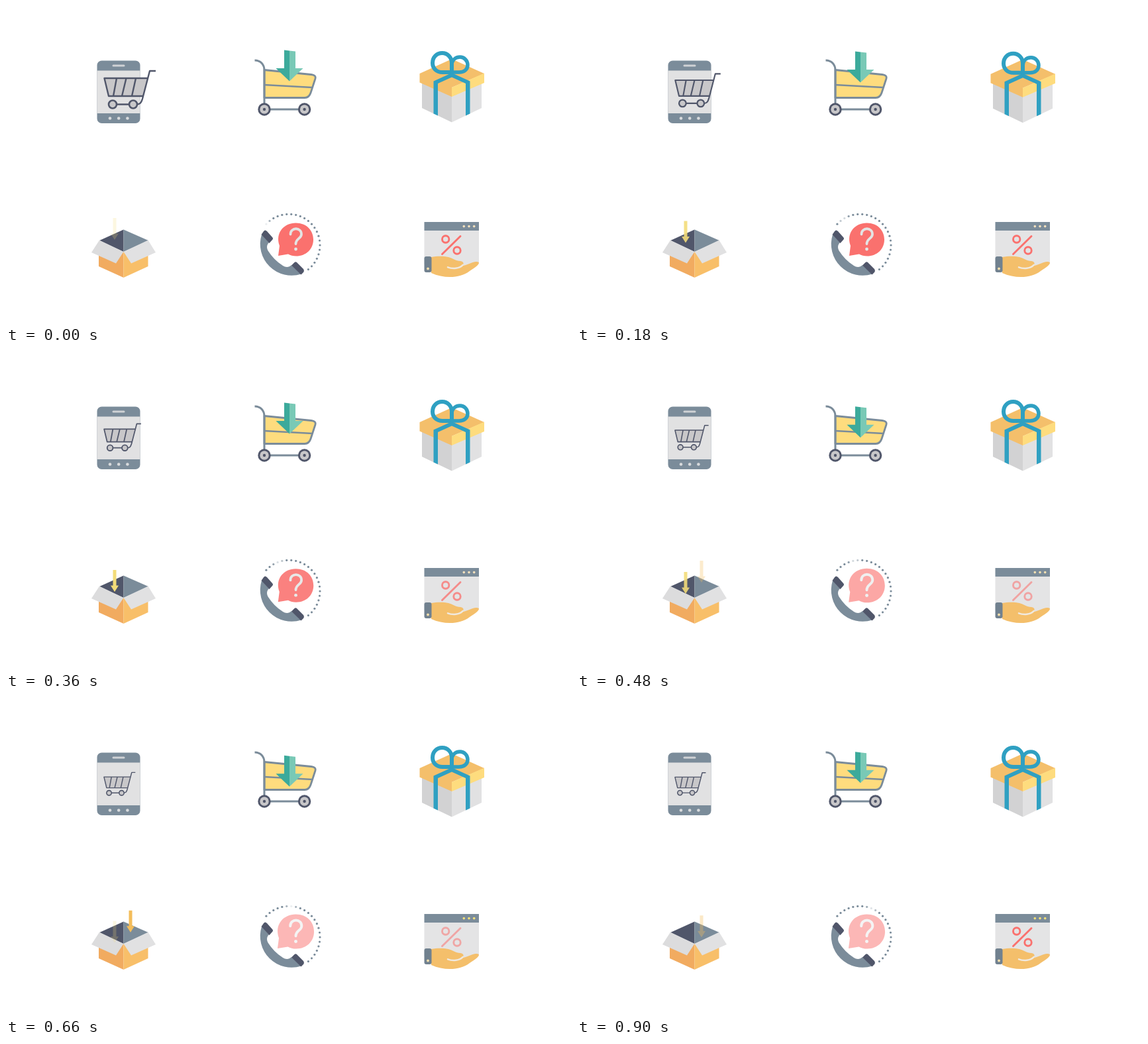
Write an HTML page with a canvas that moves like this. It is 853x480 px and loops after 960 ms.

```html
<!DOCTYPE html>
<html lang="en">
<head>
<meta charset="utf-8">
<title>Shopping icons</title>
<style>
html, body { margin: 0; width: 100%; height: 100%; overflow: hidden; background: #fff; }
canvas { display: block; }
</style>
</head>
<body>
<canvas id="stage" width="853" height="480"></canvas>
<script>
const ctx = document.getElementById('stage').getContext('2d');
const LOOP = 960, STEP = 60;
const SLATE = '#7b8c9a', DARK = '#50566a', PALE = '#e1e1e2', GREY = '#c8c7c9';
const ORANGE = '#f4bf6b', YELLOW = '#fedc7e', RED = '#fa716e', BLUE = '#2fa0c2';

const clamp = v => Math.max(0, Math.min(1, v));
const smooth = v => (v = clamp(v), v * v * (3 - 2 * v));
const settle = (t, pace) => 1 - Math.exp(-((t / pace) ** 1.8));
const bump = (t, peak, width) => Math.exp(-(((t - peak) / width) ** 2));
const window01 = (t, from, to, ramp) => clamp(Math.min(t - from, to - t) / ramp);

function fill(path, color) {
  ctx.fillStyle = color;
  ctx.fill(new Path2D(path));
}

function stroke(path, color, width, cap = 'butt') {
  ctx.strokeStyle = color;
  ctx.lineWidth = width;
  ctx.lineCap = cap;
  ctx.lineJoin = 'round';
  ctx.stroke(new Path2D(path));
}

function disc(x, y, r, color) {
  ctx.fillStyle = color;
  ctx.beginPath();
  ctx.arc(x, y, r, 0, Math.PI * 2);
  ctx.fill();
}

function ring(x, y, r, color, width) {
  ctx.strokeStyle = color;
  ctx.lineWidth = width;
  ctx.beginPath();
  ctx.arc(x, y, r, 0, Math.PI * 2);
  ctx.stroke();
}

function roundRect(x, y, w, h, r, color) {
  ctx.fillStyle = color;
  ctx.beginPath();
  ctx.roundRect(x, y, w, h, r);
  ctx.fill();
}

function group(draw) {
  ctx.save();
  draw();
  ctx.restore();
}

function scaleAbout(x, y, scale) {
  ctx.translate(x, y);
  ctx.scale(scale, scale);
  ctx.translate(-x, -y);
}

function drawPhone(t) {
  roundRect(137.5, 82.5, 65, 94.5, 7, SLATE);
  fill('M137.5 97.5H202.5V162H137.5Z', PALE);
  stroke('M162 90H178', '#cfd2d5', 3, 'round');
  for (let i = 0; i < 3; i++) disc(157 + i * 13.2, 169.5, 2.3, '#d9dbdd');

  scaleAbout(147, 135, 1 - .4 * settle(t, 325));
  fill('M148.5 109H214L207 136H155Z', GREY);
  stroke('M214 109H148.5L155 136H207M167 109L162 136M181.5 109L175 136M196 109L190 136', DARK, 2.4);
  stroke('M226 98H217L206 140C204 147 202 148.5 196 148.5H161', DARK, 2.4);
  for (const x of [161, 192]) {
    disc(x, 148.5, 6, GREY);
    ring(x, 148.5, 6, DARK, 2.6);
  }
}

function drawTrolley(t) {
  const basket = 'M390 96.5L461 103.5Q468.5 104.5 467 109.5L460 131Q457.5 138.5 451 138.5H390Z';
  fill(basket, YELLOW);
  stroke(basket, SLATE, 2.8);
  stroke('M390 119L463 123', SLATE, 2.6);
  stroke('M375.5 82C384 82 390 88 390 97V148', SLATE, 3);
  stroke('M399 156H442', SLATE, 3);
  for (const x of [390, 450.6]) {
    disc(x, 156, 9.7, DARK);
    disc(x, 156, 6.7, GREY);
    disc(x, 156, 2.2, DARK);
  }
  ctx.translate(428, 123.5 - 10.3 * Math.cos(Math.PI * (t - 40) / 640));
  fill('M-8 -47L0 -46V0L-20.5 -19.5H-8Z', '#3caa9b');
  fill('M0 -46L9 -45V-19.5H20.5L0 0Z', '#79c9b6');
}

function drawGift(t) {
  ctx.translate(0, -8.7 * bump(t, 85, 95));
  fill('M628 116L673 138V179.5L628 158Z', '#d2d2d3');
  fill('M718 116L673 138V179.5L718 158Z', PALE);
  fill('M624.5 106L673 84L722 106L673 127V141L624.5 119.5Z', ORANGE);
  fill('M722 105.5L673 127V141L722 120Z', YELLOW);
  fill('M645.5 117.5L673 105L700.5 117.5V166.5L694 169.5V121L673 111.5L652 121V169.5L645.5 166.5Z', BLUE);
  stroke('M673 104H659C650 104 644 98 644 90C644 81 650.5 75 658.5 75C667 75 673 82 673 90Z', BLUE, 6);
  stroke('M673 104H684C692 104 697 99.5 697 93C697 86 691.5 81 685.5 81C678 81 673 86 673 94Z', BLUE, 5.5);
}

function dropArrow(x, top, color, alpha) {
  group(() => {
    ctx.globalAlpha = alpha;
    ctx.translate(x, top);
    fill('M-2.5 0H2.5V23.5H6L0 33L-6 23.5H-2.5Z', color);
  });
}

function drawBox(t) {
  fill('M177.5 337.5L141 354L177.5 371Z', DARK);
  fill('M177.5 337.5L215 354L177.5 371Z', SLATE);
  fill('M140 370L177.5 371V410L140 393Z', '#f1ab60');
  fill('M177.5 371L214.5 370V393L177.5 410Z', '#f8bf69');
  fill('M141 353.5L177.5 371L166 388.5L129 372Z', '#dcdcdd');
  fill('M214.5 353.5L177.5 371L189 388.5L226 372Z', PALE);
  dropArrow(164, 320 + t / 40, '#f3dc78', window01(t, -60, 720, 270));
  dropArrow(188, 300 + t / 32, '#f4bd5b', window01(t, 400, 990, 260));
}

function drawCall(t) {
  // The dots sit on a circle of 42 places; a faded spot travels along them.
  for (let i = 0; i < 23; i++) {
    const angle = (i - 16) * Math.PI / 21 + Math.PI / 42 - Math.PI / 21 * .5 + Math.PI / 42 - Math.PI / 42;
    ctx.globalAlpha = clamp(.15 + Math.abs(i - t / 110) * .5);
    disc(427.2 + 46.8 * Math.cos(angle - Math.PI / 42 + Math.PI / 42), 361 + 46.8 * Math.sin(angle), 1.6, SLATE);
  }
  ctx.globalAlpha = 1;
  fill('M386 345A47.5 47.5 0 0 0 446 404.5L431 391C427 395 422 394.5 418 392' +
    'Q404.5 383.5 396 370C393.5 366 393 361 397 357Z', SLATE);
  fill('M385.5 345L389 340Q391 337 394 340L402 349Q404 351 402 353L397.5 358Z', DARK);
  fill('M431 391.5L435.5 387Q437.5 385.5 439.5 387.5L449 397Q451 400 448.5 402.5L445.5 405.5Z', DARK);

  const fade = smooth((t - 260) / 320);
  scaleAbout(437.5, 352.5, 1 + .04 * fade);
  ctx.globalAlpha = 1 - .5 * fade;
  fill('M413 362C406 342 420 327.5 437.5 327.5C454 327.5 464 339 464 352.5C464 367 453 377.5 438 377.5' +
    'Q431 377.5 426 374.5L411 377Z', RED);
  ctx.globalAlpha = 1;
  const shade = 228 + 16 * fade, mark = `rgb(${shade}, ${shade}, ${shade})`;
  stroke('M429.5 344.5C429.5 333.5 446 333.5 446 344.5C446 351 437.5 351 437.5 359', mark, 3.8, 'round');
  disc(437.5, 367, 2.4, mark);
}

function drawOffer(t) {
  fill('M631.5 339H714V388L700 395H640L631.5 390Z', '#e4e4e5');
  fill('M631.5 326H714V339H631.5Z', SLATE);
  const light = `rgb(243, 225, ${190 - 70 * smooth((t - 400) / 300)})`;
  for (let i = 0; i < 3; i++) disc(691.3 + i * 7.7, 332.6, 1.8, light);

  ctx.globalAlpha = 1 - .5 * Math.max(0, Math.sin(Math.PI * (t - 260) / 640));
  stroke('M658.5 374.5L686 347.5', RED, 2.9, 'round');
  ring(663.7, 352, 5.2, RED, 2.9);
  ring(681, 369, 5.2, RED, 2.9);
  ctx.globalAlpha = 1;

  fill('M642 379C652 377 661 377.5 668 379C674 380.5 679 385 686 385C692 385.5 692 391 687 392.5' +
    'C696 391.5 702 387 709 386Q714 385.5 714 388C713 392 706 396 700 400C686 411 662 412 642 403Z', ORANGE);
  stroke('M667 394.3C674 397 685 396.5 689.5 391', '#f0e9df', 2.5, 'round');
  roundRect(631.5, 378, 11, 24, 3, '#71818f');
  disc(637, 396.5, 1.9, '#f3dfab');
}

const icons = [drawPhone, drawTrolley, drawGift, drawBox, drawCall, drawOffer];

function render(now) {
  const t = Math.floor((now % LOOP) / STEP) * STEP;
  ctx.fillStyle = '#fff';
  ctx.fillRect(0, 0, 853, 480);
  for (const draw of icons) group(() => draw(t));
}

const start = performance.now();
function tick() {
  render(performance.now() - start);
  requestAnimationFrame(tick);
}
tick();
</script>
</body>
</html>
```
